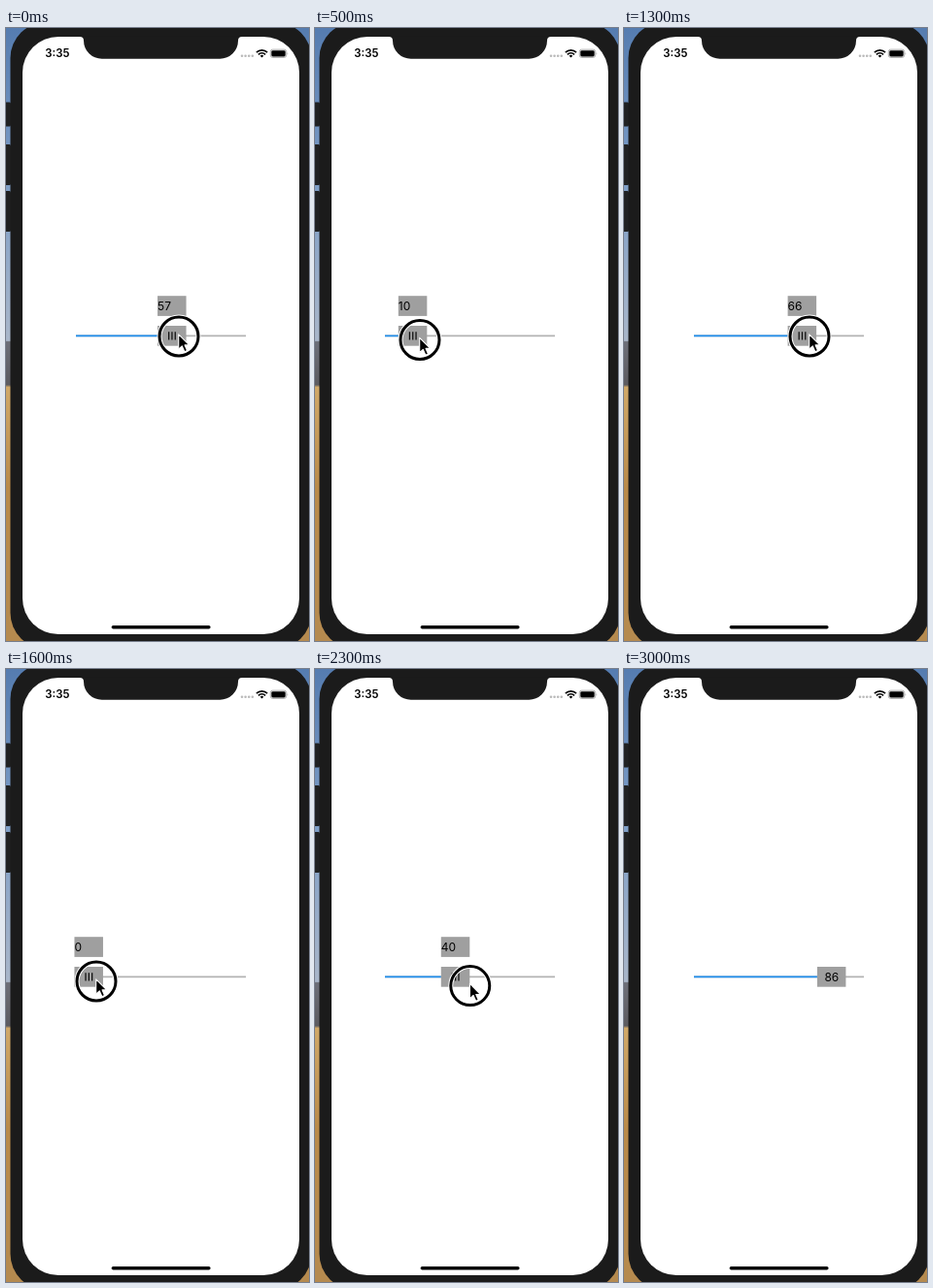
These frames come from a looping animation (312x632 px, 4100 ms). An HTML page:

```html
<!DOCTYPE html>
<html lang="en">
<head>
<meta charset="utf-8">
<title>Slider</title>
<style>
  html, body { margin: 0; width: 100%; height: 100%; overflow: hidden; }
  svg { display: block; width: 312px; height: 632px; }
  text { font-family: Inter, Roboto, sans-serif; }
</style>
</head>
<body>
<svg viewBox="0 0 312 632">
  <defs>
    <linearGradient id="backdrop" x1="0" y1="0" x2="0" y2="1">
      <stop offset="0" stop-color="#557cb0"/>
      <stop offset=".25" stop-color="#7d9dc6"/>
      <stop offset=".51" stop-color="#a9b6c9"/>
      <stop offset=".512" stop-color="#6d6f78"/>
      <stop offset=".582" stop-color="#5c5b60"/>
      <stop offset=".586" stop-color="#d0a868"/>
      <stop offset=".75" stop-color="#b98a49"/>
      <stop offset="1" stop-color="#b58a4f"/>
    </linearGradient>
  </defs>

  <rect width="312" height="632" fill="url(#backdrop)"/>
  <g fill="#202122">
    <rect x="-3" y="76.500" width="8" height="25" rx="1.500"/>
    <rect x="-3" y="120" width="8" height="42" rx="1.500"/>
    <rect x="-3" y="168" width="8" height="42" rx="1.500"/>
  </g>
  <rect x="4.500" y="-6" width="310" height="646" rx="37" fill="#1b1b1b"/>
  <rect x="17" y="9" width="285" height="616" rx="37" fill="#fff"/>
  <path d="M76 8.500V9q4 0 4 4a18.700 18.700 0 0 0 18.700 18.700H220.300a18.700 18.700 0 0 0 18.700-18.700q0-4 4-4v-.5z" fill="#1b1b1b"/>

  <text x="40.300" y="30.400" font-size="11.400" font-weight="600">3:35</text>
  <path d="M243 28.700h11" stroke="#b9b9b9" stroke-width="2.600" stroke-linecap="round" stroke-dasharray="0 3.600"/>
  <g fill="none" stroke="#000" stroke-width="1.700">
    <path d="M257.900 25.200a8 8 0 0 1 11.200 0M259.900 27.400a5.200 5.200 0 0 1 7.200 0"/>
    <path d="M261.700 28.700a2.600 2.600 0 0 1 3.600 0l-1.800 1.900z" fill="#000" stroke="none"/>
  </g>
  <rect x="272.300" y="22.200" width="16.400" height="8.200" rx="2.300" fill="none" stroke="#999" stroke-width=".8"/>
  <rect x="273.300" y="23.200" width="14.400" height="6.200" rx="1.400"/>
  <path d="M289.600 24.900q1.400 1.400 0 2.800z" fill="#999"/>
  <rect x="108.600" y="616" width="102" height="3.600" rx="1.800"/>

  <path d="M72 317.400H247" stroke="#b3b3b3" stroke-width="1.600"/>
  <path id="fill" stroke="#2190ee" stroke-width="1.700"/>
  <g id="thumb">
    <rect y="307" width="29.500" height="20.700" fill="#9f9f9f"/>
    <g id="grip">
      <rect y="276.200" width="29.500" height="20.700" fill="#9f9f9f"/>
      <path d="M11.600 313.300v8.200M14.900 313.300v8.200M18.200 313.300v8.200" stroke="#111" stroke-width="1.300"/>
    </g>
    <text id="label" font-size="12"></text>
  </g>
  <g id="pointer">
    <circle r="20" fill="none" stroke="#fff" stroke-width="5"/>
    <circle r="20" fill="none" stroke="#000" stroke-width="3"/>
    <path d="M-.3-2.200V13.200L3.300 9.900 5.900 15.700 8.500 14.600 6 8.900H10.700Z" stroke="#fff" stroke-width="1.100" stroke-linejoin="round"/>
  </g>
</svg>
<script>
const LOOP = 4100, STEP = 100, RELEASE = 3000;

// Turning points of the drag; rest is the pause before the next stroke.
const turns = [
  { at: 0, value: 57.6, x: 178, y: 318 },
  { at: 300, value: 80.1, x: 199, y: 321 },
  { at: 500, rest: 100, value: 10.6, x: 108, y: 321.5 },
  { at: 800, value: 56.9, x: 176, y: 315 },
  { at: 1200, value: 58.5, x: 180, y: 316 },
  { at: 1300, value: 66, x: 191, y: 318 },
  { at: 1600, rest: 100, value: 0.3, x: 93, y: 322 },
  { at: 2000, value: 96.4, x: 244, y: 324 },
  { at: 2500, rest: 100, value: 9.4, x: 114, y: 328 },
  { at: 2900, value: 86.3, x: 231, y: 326 }
];

const [fill, thumb, grip, label, pointer] =
  ["fill", "thumb", "grip", "label", "pointer"].map(id => document.getElementById(id));
const set = (el, attrs) => {
  for (const name in attrs) el.setAttribute(name, attrs[name]);
};
const show = (el, on) => set(el, { visibility: on ? "visible" : "hidden" });
const smooth = p => p * p * (3 - 2 * p);

function pose(time) {
  const from = turns.findLast(turn => turn.at <= time);
  const to = turns[turns.indexOf(from) + 1] || from;
  const leave = from.at + (from.rest || 0);
  const p = to === from ? 0 : smooth(Math.max(0, time - leave) / (to.at - leave));
  const mix = key => from[key] + (to[key] - from[key]) * p;
  return { value: mix("value"), x: mix("x"), y: mix("y") };
}

function draw(time) {
  const { value, x, y } = pose(time);
  const dragging = time < RELEASE;
  const left = 70 + value * 1.494;
  set(fill, { d: `M72 317.400H${Math.max(72, left)}` });
  set(thumb, { transform: `translate(${left} 0)` });
  set(label, dragging
    ? { x: 0, y: 290.8, "text-anchor": "start" }
    : { x: 14.9, y: 321.7, "text-anchor": "middle" });
  label.textContent = Math.floor(value);
  show(grip, dragging);
  show(pointer, dragging);
  set(pointer, { transform: `translate(${x} ${y})` });
}

const start = performance.now();
function tick() {
  const time = (performance.now() - start) % LOOP;
  draw(Math.floor(time / STEP) * STEP);
  requestAnimationFrame(tick);
}
tick();
</script>
</body>
</html>
```
